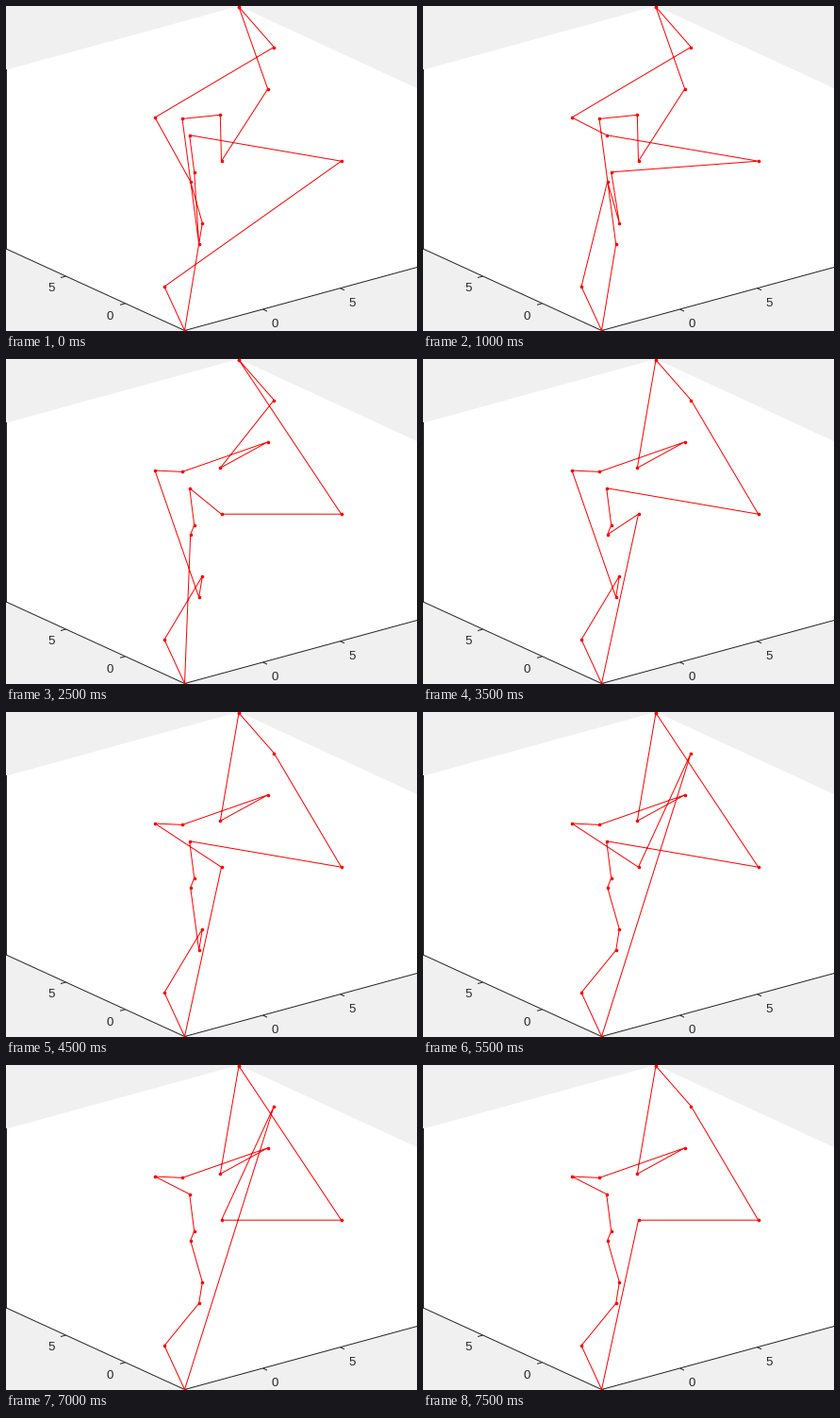
Write a matplotlib script that moves like this. It is 436 px wide and 344 px high and loops after 8 s.

```python
import numpy as np
import matplotlib.pyplot as plt
from matplotlib.animation import FuncAnimation

W, H, DPI = 436, 344, 100
PX = 72 / DPI
INK = "#262626"

CITIES = {
    "A": (247, 1), "B": (284.3, 43.5), "C": (277.7, 87.8), "D": (158, 118),
    "E": (187, 119.4), "F": (227.3, 115.3), "G": (194.7, 136.7),
    "H": (228.5, 164.2), "I": (355.7, 164.2), "J": (199.7, 175.8),
    "K": (195.7, 185.8), "L": (208.3, 229.8), "M": (204.7, 252.2),
    "N": (168, 297), "O": (189.5, 343.5),
}

# One closed tour per search step
TOURS = [
    "ACHFEMJGINOLKDB", "ACIGJMEFHNOLKDB", "ACHFEMONKLJIGDB",
    "ABDKLONMEFGJHIC", "ABDKLONMFGJHECI", "ABFCEDMLNOKJGHI",
    "ABFCEDMLNOGJKHI", "ABIGJKHONLMDECF", "AIGJKMLNOHBDECF",
    "ABIGJKMLNOHDECF", "AIGJKMLNOBHDECF", "AIGJKLMNOBHDECF",
    "ABIGJLMKNOHDECF", "ABICEDHONLMKJGF", "AIHBONMLKJGDECF",
    "ABIHONMLKJGDECF",
]

fig = plt.figure(figsize=(W / DPI, H / DPI), dpi=DPI, facecolor="#f0f0f0")
ax = fig.add_axes([0, 0, 1, 1])
ax.set_xlim(0, W)
ax.set_ylim(H, 0)
ax.axis("off")


def segment(x0, y0, x1, y1):
    ax.plot([x0, x1], [y0, y1], color=INK, lw=PX, snap=False,
            solid_capstyle="butt", zorder=2)


def label(x, y, text):
    ax.text(x, y, text, color=INK, family="Liberation Sans",
            size=13.3 * PX, ha="center", va="center_baseline")


# Walls and floor of the 3D box
ax.fill([.5, 247, 437, 437, 189.5, .5], [67.5, 0, 87.5, 276.3, 343.5, 257.5],
        color="white", lw=0, zorder=1)

segment(.5, 67, .5, 257.5)
segment(.5, 257.2, 189.5, 343.5)
segment(189.5, 343.5, 437, 276.3)

for y in (67.5, 130.5, 193.5, 257.5):
    segment(.5, y, -4, y + 1)
for x, y in ((63.5, 286), (126.5, 314.8)):
    segment(x, y, x - 5.5, y + 1.5)
for x, y in ((272.5, 321), (354.5, 298.7)):
    segment(x, y, x + 4.5, y + 2.1)

label(48, 298, "5")
label(110.3, 327.7, "0")
label(285.5, 336, "0")
label(367.5, 313.8, "5")

route, = ax.plot([], [], "-o", color="red", lw=PX, ms=3.6 * PX, mew=0,
                 snap=False, zorder=3)


def draw(step):
    tour = TOURS[step % len(TOURS)]
    pts = np.array([CITIES[c] for c in tour + tour[0]])
    route.set_data(pts[:, 0], pts[:, 1])
    return route,


anim = FuncAnimation(fig, draw, frames=len(TOURS), interval=500,
                     repeat=True, repeat_delay=0)
plt.show()
```
